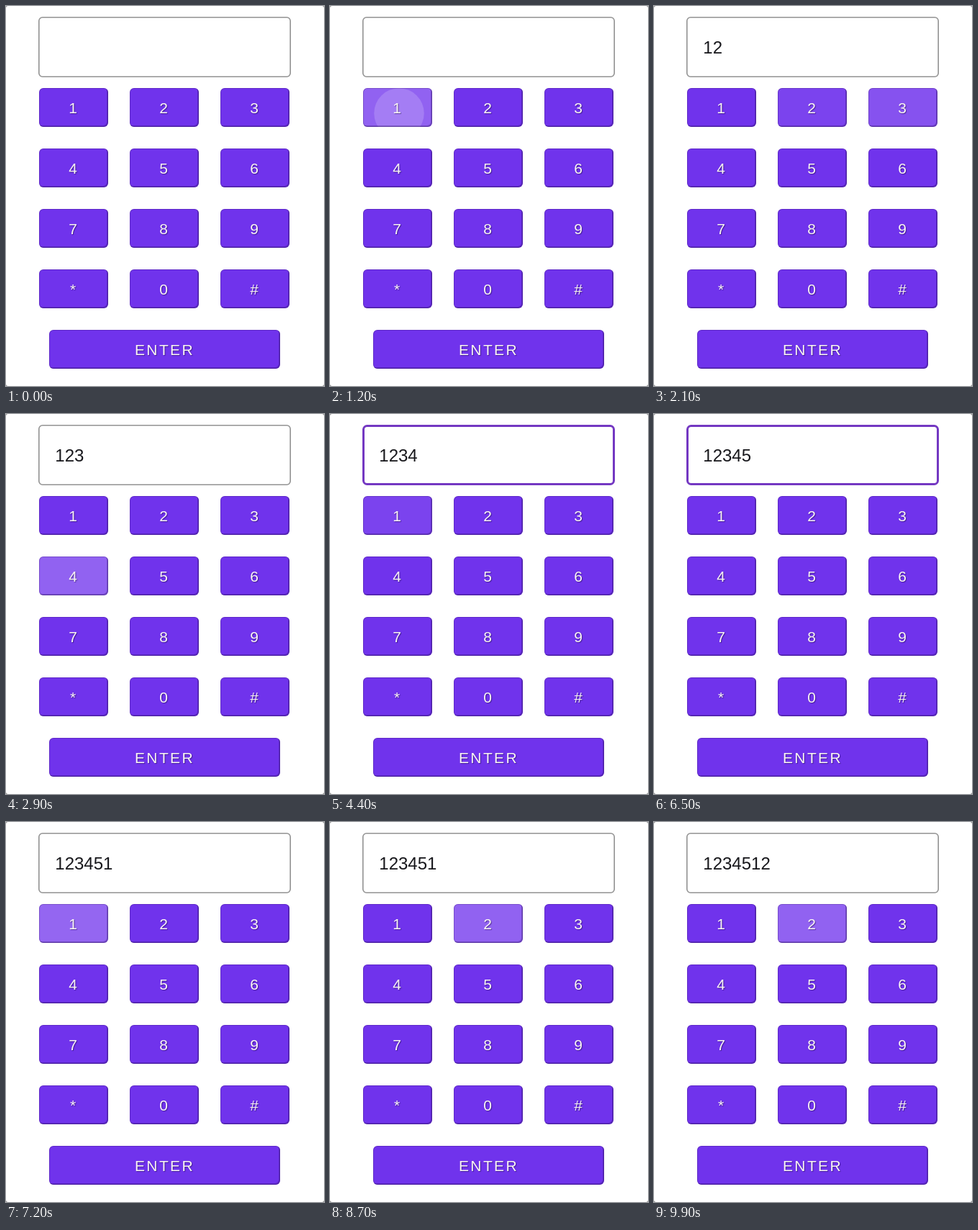
An HTML page with a canvas that plays this animation: 442 by 528 pixels, repeating every 10000 ms.

```html
<!DOCTYPE html>
<html lang="en">
<head>
<meta charset="utf-8">
<title>Keypad</title>
<style>
html, body { margin: 0; width: 100%; height: 100%; overflow: hidden; background: #fff; }
canvas { display: block; width: 442px; height: 528px; }
</style>
</head>
<body>
<canvas id="stage" width="442" height="528"></canvas>
<script>
const ctx = document.getElementById('stage').getContext('2d');
const FONT = '"Liberation Sans", Arial, sans-serif';
const LOOP = 10000, STEP = 100, FADE = 150;
const LABELS = '123456789*0#';

// Pointer over a key: label, from, to
const hovers = [
  ['1', 1000, 1500], ['2', 1500, 2000], ['3', 2000, 2600], ['4', 2700, 3500],
  ['1', 4350, 4500], ['5', 4700, 5800], ['1', 6600, 7600], ['2', 8500, 10000]
];

// Press times; the digit appears on release
const presses = [
  ['1', 1150], ['2', 1700], ['3', 2250], ['4', 2950],
  ['5', 5100], ['1', 6850], ['2', 9050]
];
const RELEASE = 150;

// Display has keyboard focus: from, to
const focused = [[3900, 5100], [6200, 6850], [7800, 8700]];

const clamp = v => Math.max(0, Math.min(1, v));
const easeOut = p => 1 - (1 - p) ** 2;

function box(x, y, w, h, r) {
  ctx.beginPath();
  ctx.roundRect(x, y, w, h, r);
}

function write(text, x, y, size, color, spacing, align) {
  ctx.font = size + 'px ' + FONT;
  ctx.letterSpacing = spacing + 'px';
  ctx.textAlign = align;
  ctx.fillStyle = color;
  ctx.fillText(text, x, y);
}

function glow(label, t) {
  let v = 0;
  for (const [key, from, to] of hovers) {
    if (key !== label || t < from) continue;
    v = Math.max(v, Math.min(clamp((t - from) / FADE), 1 - clamp((t - to) / FADE)));
  }
  return v;
}

function ripple(label, x, y, t) {
  for (const [key, start] of presses) {
    const age = t - start;
    if (key !== label || age < 0 || age > 400) continue;
    const r = 17 + 45 * easeOut(clamp(age / 225));
    const alpha = 0.17 * clamp(age / 50) * (1 - clamp((age - 225) / FADE));
    ctx.fillStyle = `rgba(255,255,255,${alpha})`;
    ctx.beginPath();
    ctx.arc(x + 50, y + 35, r, 0, Math.PI * 2);
    ctx.fill();
  }
}

function button(label, x, y, w, t, spacing) {
  const h = 54;
  ctx.save();
  box(x, y, w, h, 6);
  ctx.clip();
  ctx.fillStyle = '#7033ec';
  ctx.fillRect(x, y, w, h);
  ctx.fillStyle = `rgba(255,255,255,${0.23 * glow(label, t)})`;
  ctx.fillRect(x, y, w, h);
  ripple(label, x, y, t);
  // Bevel: thin all round, heavier on the right and bottom
  ctx.strokeStyle = 'rgba(40,15,90,0.25)';
  ctx.lineWidth = 2;
  box(x, y, w, h, 6);
  ctx.stroke();
  ctx.strokeStyle = 'rgba(40,15,90,0.3)';
  ctx.lineWidth = 2;
  box(x - 6, y - 6, w + 5, h + 5, 6);
  ctx.stroke();
  ctx.restore();

  ctx.shadowColor = 'rgba(30,10,70,0.5)';
  ctx.shadowOffsetX = ctx.shadowOffsetY = 1;
  ctx.shadowBlur = 1;
  write(label, x + w / 2, y + 34.5, 21, '#f9f5f3', spacing, 'center');
  ctx.shadowColor = 'transparent';
}

function display(t) {
  const active = focused.some(([from, to]) => t >= from && t < to);
  const line = active ? 3 : 1.6;
  ctx.strokeStyle = active ? '#7438c2' : '#929292';
  ctx.lineWidth = line;
  box(45 + line / 2, 15 + line / 2, 351 - line, 84 - line, 5);
  ctx.stroke();
  const typed = presses.filter(p => t >= p[1] + RELEASE).map(p => p[0]).join('');
  write(typed, 68.3, 65.5, 24, '#18181c', 0, 'left');
}

function draw(t) {
  ctx.fillStyle = '#8a8a8a';
  ctx.fillRect(0, 0, 442, 528);
  ctx.fillStyle = '#fff';
  box(0, 0, 442, 528, 3);
  ctx.fill();
  display(t);
  [...LABELS].forEach((label, i) => {
    button(label, 46 + 126 * (i % 3), 114 + 84 * Math.floor(i / 3), 96, t, 2);
  });
  button('ENTER', 60, 450, 321, t, 2.4);
}

const begin = performance.now();
function tick() {
  const t = (performance.now() - begin) % LOOP;
  draw(Math.floor(t / STEP) * STEP);
  requestAnimationFrame(tick);
}
tick();
</script>
</body>
</html>
```
